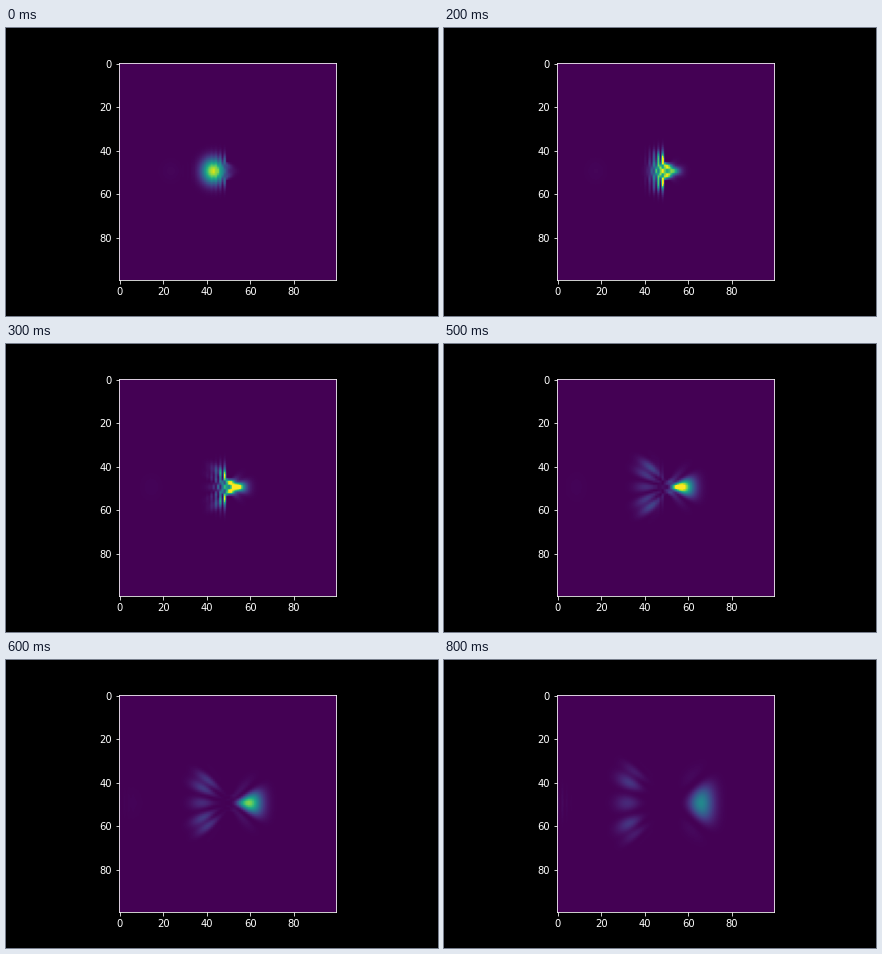
These frames come from a looping animation (432x288 px, 10000 ms). A matplotlib script:

```python
import numpy as np
import matplotlib.pyplot as plt
from matplotlib.animation import FuncAnimation

SIZE = 100
LAST_MOVING = 8          # the packet stops here until the loop restarts
LEAD_TIME = 10.0         # evolution before the first picture
TIME_PER_FRAME = 3.0
DT = 0.1

y, x = np.mgrid[:SIZE, :SIZE]

# Hard wall with a slit in the middle
is_open = ~((x >= 49) & (x <= 51) & ((y < 46) | (y > 53)))


def initial_packet(x0=33, y0=49.5, width=5, k=np.pi / 2, echo=0.12):
    envelope = np.exp(-((x - x0) ** 2 + (y - y0) ** 2) / (2 * width**2))
    phase = k * (x - x0)
    return envelope * (np.exp(1j * phase) + echo * np.exp(-1j * phase)) * is_open


def derivative(psi):
    """Lattice Schroedinger equation with zero value at walls and edges."""
    p = np.pad(psi, 1)
    laplacian = p[2:, 1:-1] + p[:-2, 1:-1] + p[1:-1, 2:] + p[1:-1, :-2] - 4 * psi
    return 0.5j * laplacian * is_open


def evolve(psi, duration):
    for _ in range(round(duration / DT)):
        k1 = derivative(psi)
        k2 = derivative(psi + DT / 2 * k1)
        k3 = derivative(psi + DT / 2 * k2)
        k4 = derivative(psi + DT * k3)
        psi = psi + DT / 6 * (k1 + 2 * k2 + 2 * k3 + k4)
    return psi


def simulate():
    psi = evolve(initial_packet(), LEAD_TIME)
    densities = [np.abs(psi) ** 2]
    for _ in range(LAST_MOVING):
        psi = evolve(psi, TIME_PER_FRAME)
        densities.append(np.abs(psi) ** 2)
    return densities


densities = simulate()

plt.style.use("dark_background")
plt.rcParams.update({"font.family": "DejaVu Sans", "font.size": 10})
fig, ax = plt.subplots(figsize=(6, 4), dpi=72)
fig.subplots_adjust(left=0.125, right=0.9, bottom=0.125, top=0.88)
image = ax.imshow(densities[0], cmap="viridis", vmin=0, vmax=1)
ax.set_xticks(range(0, SIZE, 20))
ax.set_yticks(range(0, SIZE, 20))


def update(frame):
    image.set_data(densities[min(frame, LAST_MOVING)])
    return [image]


anim = FuncAnimation(fig, update, frames=100, interval=100, repeat=True, repeat_delay=0)
plt.show()
```
